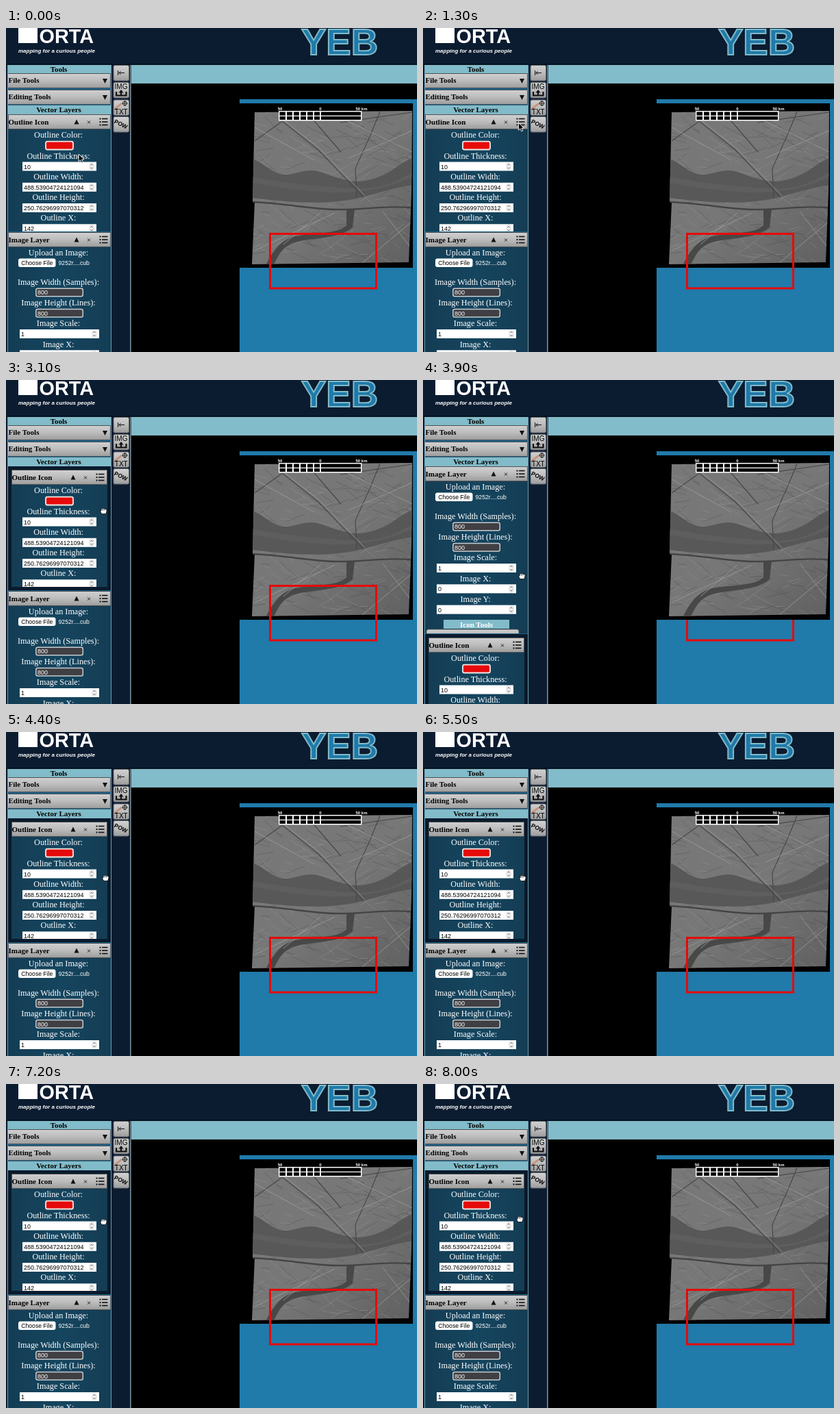
An HTML page that plays this animation: 600x473 px, repeating every 8100 ms.

```html
<!DOCTYPE html>
<html lang="en">
<head>
<meta charset="utf-8">
<title>Layer sorting</title>
<style>
html, body { margin: 0; width: 100%; height: 100%; overflow: hidden; background: #0c1c30; }
svg { display: block; width: 600px; height: 473px; }
text { font-family: "Liberation Serif", "Times New Roman", serif; white-space: pre; }
.sans { font-family: "Liberation Sans", Arial, sans-serif; }
.label { font-size: 12.2px; fill: #fff; text-anchor: middle; }
.head { font-size: 11px; font-weight: bold; fill: #000; }
.mid { text-anchor: middle; }
.bold { font-weight: bold; }
</style>
</head>
<body>
<svg id="stage" viewBox="0 0 600 473"></svg>
<script>
const LOOP = 8100, STEP = 100;
const TEAL = '#82bbc9', BLUE = '#207aaa', NAVY = '#0c1c30', RED = '#e60a0a';
const stage = document.getElementById('stage');

const rect = (x, y, w, h, fill, more = '') =>
  `<rect x="${x}" y="${y}" width="${w}" height="${h}" fill="${fill}" ${more}/>`;
const text = (x, y, s, cls, more = '') =>
  `<text x="${x}" y="${y}" class="${cls}" ${more}>${s}</text>`;
const path = (d, more) => `<path d="${d}" ${more}/>`;
const line = (d, color, width = 1) =>
  path(d, `fill="none" stroke="${color}" stroke-width="${width}"`);
const label = (y, s) => text(76.5, y, s, 'label');

function field(x, y, w, value) {
  const r = x + w - 7;
  return rect(x, y, w, 13, '#fff') +
    text(x + 2, y + 10, value, 'sans', 'font-size="9"') +
    rect(r - 3, y + 1.5, 6, 10, '#f4f4f4', 'rx="2.5" stroke="#c4c4c4" stroke-width=".6"') +
    line(`M${r - 1.5} ${y + 5}l1.5 -1.8l1.5 1.8M${r - 1.5} ${y + 8}l1.5 1.8l1.5 -1.8`, '#444', .8);
}

const darkField = y =>
  rect(43.8, y, 68.5, 11.5, '#403f43', 'rx="2.5" stroke="#c5cbd0" stroke-width="1.5"') +
  text(46, y + 9, '800', 'sans', 'font-size="9" fill="#fff"');

const bar = (x, y, w, h) =>
  rect(x + .5, y + .5, w - 1, h - 1, 'url(#grey)', 'rx="1" stroke="#4d5154"');

function listIcon(x, y) {
  return [0, 4.5, 9].map(d =>
    rect(x, y + d - 1, 2, 2, '#111') + rect(x + 3.5, y + d - .8, 8.5, 1.6, '#111')).join('');
}

function layerHead(x, w, name) {
  const r = x + w;
  return bar(x, 0, w, 22) + text(x + .5, 15, name, 'head') +
    path(`M${r - 53.5} 14.5h7l-3.5 -7z`, 'fill="#111"') +
    line(`M${r - 34} 9.5l4 4m0 -4l-4 4`, '#222', 1) +
    listIcon(r - 16.5, 6.5);
}

const outlineBody = () =>
  label(34, 'Outline Color:') +
  rect(58, 39.7, 40, 11.8, RED, 'rx="2.5" stroke="#eeeae6" stroke-width="1.8"') +
  label(65, 'Outline Thickness:') + field(24, 69.5, 108, '10') +
  label(95, 'Outline Width:') + field(24, 99.8, 108, '488.53904724121094') +
  label(125, 'Outline Height:') + field(24, 130, 108, '250.76296997070312') +
  label(155, 'Outline X:') + field(24, 160.3, 108, '142');

const imageBody = () =>
  label(34, 'Upload an Image:') +
  rect(18, 38.5, 54.5, 12.5, '#fff', 'rx="3"') +
  text(45.3, 48, 'Choose File', 'sans mid', 'font-size="8.6"') +
  text(76.5, 48, '9252r....cub', 'sans', 'font-size="8.7" fill="#fff"') +
  label(76.5, 'Image Width (Samples):') + darkField(82.3) +
  label(107, 'Image Height (Lines):') + darkField(112.5) +
  label(137, 'Image Scale:') + field(20, 142, 116, '1') +
  label(167.5, 'Image X:') + field(20, 172.3, 116, '0') +
  label(197.5, 'Image Y:') + field(20, 202.6, 116, '0') +
  rect(30, 224, 96, 13, TEAL) +
  text(78, 234.5, 'Icon Tools', 'label bold', 'style="font-size:11px"') +
  rect(5, 238, 135, 12, 'url(#grey)', 'rx="3" stroke="#444" stroke-width=".7"');

function layer(id, clip, x, w, name, body, under = '') {
  return `<g id="${id}">${under}<g clip-path="url(#${clip})">` +
    rect(x, 0, w, 260, 'url(#panel)') + body() + layerHead(x, w, name) + '</g></g>';
}

function toolButton(y, icon) {
  return rect(157, y, 22.5, 22.5, 'url(#grey)', 'rx="2" stroke="#62676a"') + icon;
}

function toolbar() {
  const black = '#111';
  return toolButton(54.5,
      line('M163.5 62v7M173 65.5h-8m2.5 -2.5l-2.5 2.5l2.5 2.5', black, 1)) +
    toolButton(79.5, text(168, 89, 'IMG', 'sans mid', 'font-size="10"') +
      line('M161 93v5.5h14.5v-5.5M168 98v-6', black, 2.2) +
      path('M164.5 94.5h7l-3.5 -4.5z', `fill="${black}"`)) +
    toolButton(105,
      line('M159 118l10 -8', '#c98d75', 2.5) + line('M158.5 119.5l3 -2', black, 1) +
      `<circle cx="173.5" cy="110" r="3" fill="#ddd" stroke="${black}"/>` +
      line('M169.5 110h8M173.5 106v8', black, .9) +
      text(168.3, 125.5, 'TXT', 'sans mid', 'font-size="10"')) +
    toolButton(129.5, text(167.5, 143.5, 'POW', 'sans mid bold',
      'font-size="8.5" transform="rotate(26 168 141)"'));
}

function seeded(seed) {
  return () => (seed = (seed * 16807) % 2147483647) / 2147483647;
}

// Soft stand-in for the photographed terrain
function terrain() {
  const rnd = seeded(41);
  let ridges = '';
  for (let i = 0; i < 220; i++) {
    const x = 355 + rnd() * 232, y = 120 + rnd() * 222;
    const steep = rnd() < .55 ? 1 : -.8, len = 8 + rnd() * 28;
    const tone = rnd() < .5 ? '#a0a0a0' : '#4a4a4a';
    ridges += `<path d="M${x.toFixed(1)} ${y.toFixed(1)}l${len.toFixed(1)} ${(len * steep * rnd()).toFixed(1)}" stroke="${tone}"/>`;
  }
  return '<g clip-path="url(#land)">' + rect(358, 120, 237, 228, 'url(#ground)') +
    `<g fill="none" stroke-width=".8" opacity=".45">${ridges}</g>` +
    path('M360 191C375 196 390 214 408 214S440 203 462 211S510 230 540 219S575 195 596 190V229C570 232 548 240 520 247S450 260 360 248Z', 'fill="#555" opacity=".9"') +
    path('M360 218C410 226 450 231 500 234S570 223 596 209V216C560 234 520 241 480 240S400 233 360 226Z', 'fill="#5e5e5e"') +
    path('M497 264L509 264L506 291C490 306 456 306 430 311S400 329 391 345H380C388 328 400 309 423 304S486 301 497 288Z', 'fill="#484848"') +
    line('M360 254C410 256 440 264 480 265S560 258 596 263', '#444', 2.4) +
    line('M403 136L455 177L522 247M438 122L489 181M546 122L533 154L510 205L512 248M363 165L402 137M488 138L593 123', '#484848', 1.2) +
    line('M405 134L457 175L524 245M363 145L450 193M470 122L593 181M500 190L593 150M460 269L405 316M363 325L480 270M550 268L592 322M520 343L592 283', '#9c9c9c', .8) +
    '</g>';
}

function scaleBar() {
  let ticks = '';
  for (let x = 409; x < 459; x += 10) ticks += `M${x} 122v13`;
  const mark = (x, s) => text(x, 119.7, s, 'sans mid bold', 'font-size="6" fill="#fff"');
  return rect(398.7, 121.7, 120, 13, '#000', 'stroke="#fff" stroke-width="1.5"') +
    line(ticks + 'M459 122v13', '#fff', 2) + line('M399 128.3h120', '#fff', 1.3) +
    mark(400, '50') + mark(459, '0') + mark(519, '50 km');
}

function build() {
  const stops = list => list.map(([at, c]) => `<stop offset="${at}" stop-color="${c}"/>`).join('');
  const grad = (id, dir, list) => `<linearGradient id="${id}" ${dir}>${stops(list)}</linearGradient>`;
  const down = 'x1="0" y1="0" x2="0" y2="1"';
  stage.innerHTML = '<defs>' +
    grad('grey', down, [[0, '#d0d0d0'], [.5, '#bcbcbc'], [1, '#9c9c9c']]) +
    grad('panel', 'x1="0" x2="1"', [[0, '#143d54'], [.5, '#15455f'], [1, '#143d54']]) +
    grad('ground', 'x1="0" y1="0" x2="1" y2="1"', [[0, '#787878'], [.5, '#777'], [1, '#606060']]) +
    `<clipPath id="land"><path d="M363 123L593 121L592 240L588 342L359 345L363 255L360 254Z"/></clipPath>
    <clipPath id="wide"><path d="M3 0H153V171H3Z"/></clipPath>
    <clipPath id="slim"><path d="M8 0H148V171H8Z"/></clipPath>
    <clipPath id="tall"><path d="M3 0H153V244H3Z"/></clipPath></defs>` +
    rect(0, 0, 600, 473, NAVY) +
    rect(18, -6, 28, 28, '#fff') +
    text(48.5, 22, 'ORTA', 'sans bold', 'font-size="28.8" fill="#fff"') +
    text(18, 36, 'mapping for a curious people', 'sans bold', 'font-size="8" font-style="italic" fill="#fff"') +
    text(431, 39, 'YEB', 'sans bold', `font-size="54.5" fill="${BLUE}" stroke="${TEAL}" stroke-width="2"`) +
    rect(0, 52, 600, 2, '#061220') +
    rect(2, 54, 152, 419, '#1c6289') +
    rect(3, 54, 150, 12, TEAL) + text(77, 63.5, 'Tools', 'head mid') +
    [[66, 'File Tools'], [90, 'Editing Tools']].map(([y, s]) =>
      bar(2, y, 151, 22) + text(3.5, y + 14, s, 'head') +
      path(`M141 ${y + 8}h7l-3.5 7z`, 'fill="#111"')).join('') +
    rect(3, 113, 150, 13, TEAL) + text(77, 123, 'Vector Layers', 'head mid') +
    layer('image', 'tall', 3, 150, 'Image Layer', imageBody) +
    layer('rest', 'wide', 3, 150, 'Outline Icon', outlineBody) +
    layer('drag', 'slim', 8, 140, 'Outline Icon', outlineBody, rect(3, -5, 150, 181, '#0a1a2c')) +
    '<rect id="hover" x="125.5" y="131.5" width="21.5" height="21.5" fill="#71899a" fill-opacity=".3" stroke="#38566b"/>' +
    line('M2.5 54V473M153.5 54V473', '#6a9fb2', 1) +
    toolbar() +
    rect(181, 54, 1.5, 419, '#7d8c97') +
    rect(183, 54, 417, 27, TEAL) + rect(183, 81, 417, 392, '#000') +
    rect(341, 104, 259, 369, BLUE) + rect(341, 110, 253, 240, '#000') +
    terrain() +
    `<path id="frame" fill="none" stroke="${RED}" stroke-width="3"/>` +
    scaleBar() +
    path('M0 0V11L2.6 8.7L4.5 12.7L6.4 11.8L4.6 8H8Z', 'id="arrow" fill="#000" stroke="#fff" stroke-width=".9"') +
    path('M-3 5L-6 0Q-6 -2 -4 -.5L-3 .5L-4 -4Q-3.3 -5.5 -2.3 -4L-1.5 -1L-1.4 -5Q-.3 -6.3 .4 -5L.7 -1L1.7 -4.5Q3 -5.2 3.3 -4L2.8 -.5L4 -2.5Q5.5 -2.8 5.2 -1L3.5 5Z',
      'id="open" fill="#fff" stroke="#111" stroke-width=".8"') +
    path('M-2.8 4.5L-4.5 1.5Q-5 -.8 -3.3 -.5V-2.6Q-2.2 -4.2 -1 -3Q.2 -4.2 1.3 -2.8Q3 -3.6 3.5 -2Q5 -2.1 4.6 .2L3.2 4.5ZM-1 -2.6V-.5M1.3 -2.5V-.5',
      'id="fist" fill="#fff" stroke="#111" stroke-width=".9"');
}

build();
const $ = id => document.getElementById(id);
const place = (id, x, y) => $(id).setAttribute('transform', `translate(${x} ${y})`);
const show = (id, on) => $(id).setAttribute('display', on ? 'inline' : 'none');

// time, x, y of the pointer
const TRACK = [
  [0, 106, 185], [500, 108, 184], [1500, 143, 134], [2100, 143, 134],
  [3100, 142, 190], [3500, 144, 314], [3900, 144, 285], [4500, 145, 206],
  [5500, 145, 212], [6100, 145, 314], [6400, 145, 281], [7100, 142, 200],
  [8000, 141, 196], [8100, 141, 196]
];

function pointer(t) {
  const i = TRACK.findIndex(k => k[0] > t);
  const [a, ax, ay] = TRACK[i - 1], [b, bx, by] = TRACK[i];
  const p = (t - a) / (b - a), e = p * p * (3 - 2 * p);
  return [ax + (bx - ax) * e, ay + (by - ay) * e];
}

const within = (t, a, b) => t >= a && t < b;

function draw(now) {
  const t = Math.floor((now % LOOP) / STEP) * STEP;
  const dragging = t >= 2000;
  const swapped = within(t, 3500, 4300) || within(t, 6100, 6900);
  const [x, y] = pointer(t);

  show('rest', !dragging);
  show('drag', dragging);
  place('rest', 0, 126);
  place('drag', 0, swapped ? 376 : 131);
  place('image', 0, swapped ? 126 : dragging ? 308 : 298);
  show('hover', within(t, 2000, 2300));
  $('frame').setAttribute('d', swapped ? 'M385.5 350V380H540.5V350' : 'M385.5 300.5H540.5V380H385.5Z');

  show('arrow', t < 1400);
  show('open', within(t, 1400, 2300));
  show('fist', t >= 2300);
  place('arrow', x, y - 1);
  place('open', x + 1, y);
  place('fist', x + .5, y + 1);
}

function tick(now) {
  draw(now);
  requestAnimationFrame(tick);
}

draw(0);
requestAnimationFrame(tick);
</script>
</body>
</html>
```
